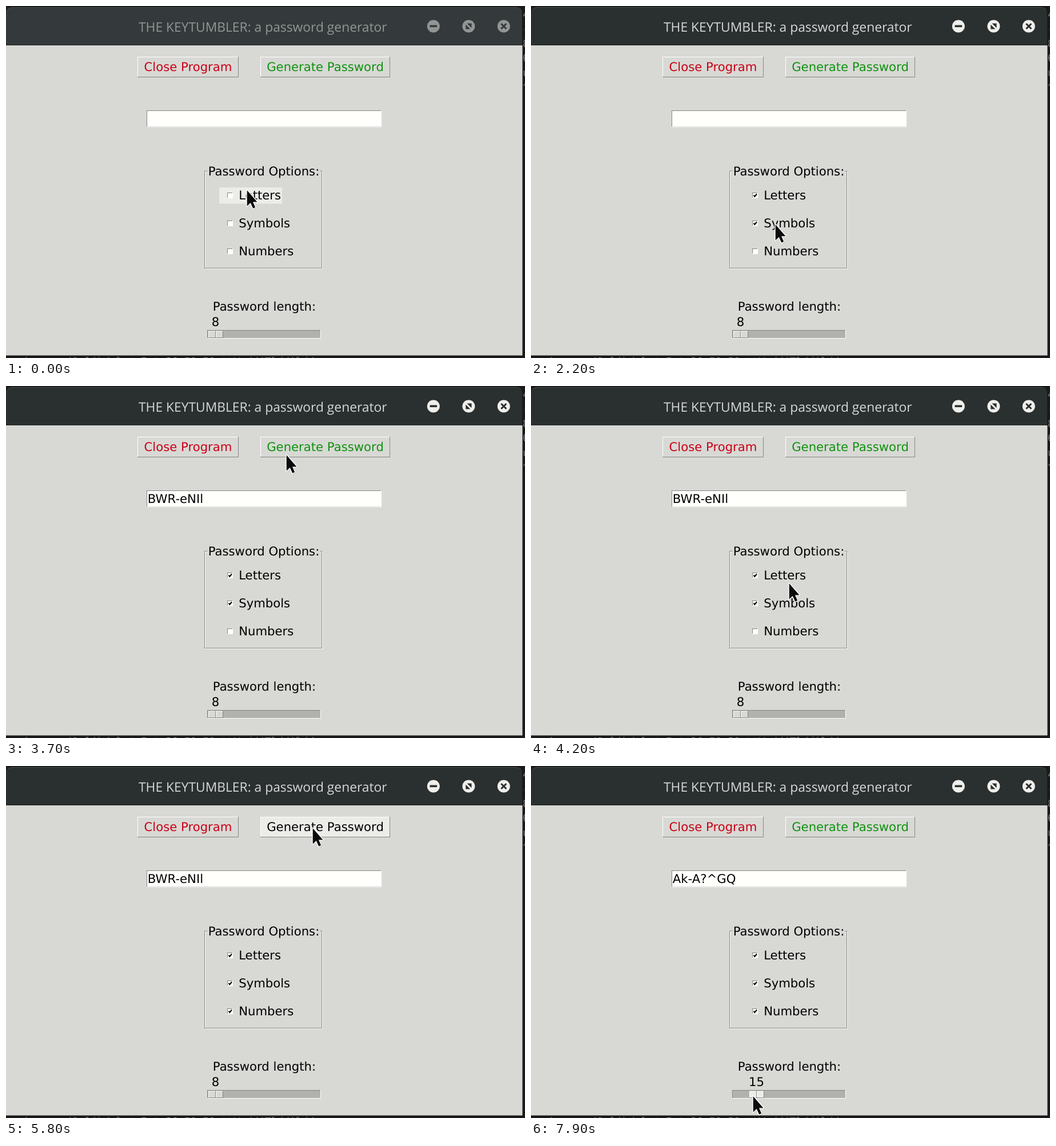
Recreate the animation shown at these times as an HTML page. Size 908 px wide and 617 px high, loop 8000 ms.

```html
<!DOCTYPE html>
<html lang="en">
<head>
<meta charset="utf-8">
<title>Password generator</title>
<style>
  html, body { margin: 0; width: 100%; height: 100%; overflow: hidden; background: #191a1a; }
  svg { display: block; width: 908px; height: 617px; }
  text { font: 21.2px "DejaVu Sans", sans-serif; text-rendering: geometricPrecision; white-space: pre; }
  .mid { text-anchor: middle; }
  .terminal text { font: 18px "DejaVu Sans Mono", monospace; fill: #777a78; }
  .caption { font: 22.8px "Open Sans", "Noto Sans", sans-serif; }
  .bar { fill: #343a3b; }
  .caption, .knob { fill: #929594; }
  .glyph { fill: #343a3b; stroke: #343a3b; stroke-width: 0; }
  .active .bar { fill: #2a2f30; }
  .active .caption { fill: #d6d9d7; }
  .active .knob { fill: #efefeb; }
  .active .glyph { fill: #2a2f30; stroke: #2a2f30; }
</style>
</head>
<body>
<svg viewBox="0 0 908 617">
  <rect width="908" height="617" fill="#191a1a"/>
  <g class="terminal" id="terminal">
    <text x="30" y="628.5">i sers (Delibdolet I t 26 50 50 ttWedd(Tldd|ldd</text>
  </g>
  <g id="window">
    <path class="bar" d="M0 70V10Q2 2 11 2H892Q903 2 903 13V70Z"/>
    <path d="M3 6Q6 2.5 12 2.5H892Q898 2.5 901 6" fill="none" stroke="#454b4c"/>
    <rect y="68" width="903" height="1" fill="#202526"/>
    <text class="caption" x="232" y="45">THE KEYTUMBLER: a password generator</text>
    <g class="knob">
      <circle cx="747.8" cy="35.5" r="11"/><circle cx="809.4" cy="35.5" r="11"/><circle cx="870.8" cy="35.5" r="11"/>
    </g>
    <g class="glyph">
      <rect x="741.5" y="33.5" width="12.6" height="3.6"/>
      <path d="M806.5 30.5H814.5V38.5ZM804.3 32.5V40.5H812.3Z"/>
      <path d="M866.3 31L875.3 40M875.3 31L866.3 40" style="stroke-width:3"/>
    </g>
    <rect y="69" width="903.5" height="543.5" fill="#d8d9d5"/>
    <g id="widgets"></g>
    <g id="cursor">
      <path d="M2 2V30L8.5 24.5L13 34.5L17.5 32.5L13.5 23H21Z" opacity=".18"/>
      <path d="M.7 1V28.7L6.7 23L11.2 32.8L15.2 31L11 21.5H18.5Z" fill="#0b0b0b" stroke="#fff" stroke-width="2.8" stroke-linejoin="round" paint-order="stroke"/>
    </g>
  </g>
</svg>
<script>
const LOOP = 8000, STEP = 100;
const FACE = '#d8d9d5', HOT = '#ecece9', PAPER = '#fffffb', LIGHT = '#ffffff', DARK = '#858683';
const $ = id => document.getElementById(id);

// Pointer: it rests at one place until the next move begins.
const home = { x: 421, y: 322 };
const moves = [
  { from: 1300, to: 1600, x: 427, y: 382 },
  { from: 2200, to: 2300, x: 431, y: 398 },
  { from: 2300, to: 2500, x: 466, y: 225 },
  { from: 2600, to: 3000, x: 488, y: 127 },
  { from: 3100, to: 3200, x: 490, y: 120 },
  { from: 3700, to: 4200, x: 451, y: 345 },
  { from: 4200, to: 4500, x: 449, y: 421 },
  { from: 5000, to: 5500, x: 536, y: 108 },
  { from: 6500, to: 6600, x: 388, y: 404 },
  { from: 6700, to: 7400, x: 360, y: 577 },
  { from: 7600, to: 7900, x: 388, y: 578 }
];
const clicks = [1100, 1700, 3200, 4700, 6000];
const dragStart = 7600;
const passwords = ['', 'BWR-eNIl', 'Ak-A?^GQ'];

const smooth = p => p * p * (3 - 2 * p);
function pointerAt(t) {
  let { x, y } = home;
  for (const move of moves) {
    if (t <= move.from) break;
    const p = smooth(Math.min(1, (t - move.from) / (move.to - move.from)));
    x += (move.x - x) * p;
    y += (move.y - y) * p;
  }
  return { x, y };
}

const generate = { x: 445, y: 89, w: 227, h: 36 };
const track = { x: 352, y: 568, w: 199, h: 15 };
const options = [['Letters', 110], ['Symbols', 127], ['Numbers', 133]]
  .map(([name, w], i) => ({ name, x: 373, y: 318 + 49 * i, w, h: 28.5 }));
const targets = [generate, track, ...options];

function widgetAt(t) {
  const p = pointerAt(t);
  return targets.find(r => p.x >= r.x && p.x < r.x + r.w && p.y >= r.y && p.y < r.y + r.h);
}

const rect = (x, y, w, h, fill) =>
  `<rect x="${x}" y="${y}" width="${w}" height="${h}" fill="${fill}"/>`;

function bevel({ x, y, w, h }, fill, sunken) {
  const [top, low] = sunken ? [DARK, LIGHT] : [LIGHT, DARK];
  return rect(x, y, w, h, low) + rect(x, y, w - 1, h - 1, top) +
         rect(x + 1, y + 1, w - 2, h - 2, fill);
}

const label = (s, x, y, fill = '#000', align = 'mid') =>
  `<text x="${x}" y="${y}" fill="${fill}" class="${align}">${s}</text>`;

function option(box, ticked, hot) {
  const { x, y, w, h, name } = box;
  const tick = `<path d="M389.5 ${y + 13.5}l1.8 2.5l3.7 -4.5" fill="none" stroke="#000" stroke-width="2"/>`;
  return (hot ? rect(x, y, w, h, HOT) : '') +
    bevel({ x: 387, y: y + 9, w: 10, h: 10 }, PAPER, true) +
    (ticked ? tick : '') + label(name, 407.2, y + 21, '#000', 'left');
}

function generateButton(hot, pressed) {
  const shift = pressed ? 1 : 0;
  return bevel(generate, hot ? HOT : FACE, pressed) +
    label('Generate Password', 558.5 + shift, 114 + shift, hot ? '#000' : '#0f920f');
}

function optionFrame() {
  const outline = (d, color) =>
    `<rect x="${347.5 + d}" y="${289.5 + d}" width="205" height="170" fill="none" stroke="${color}"/>`;
  return outline(1, LIGHT) + outline(0, DARK) + rect(353, 278, 196, 24, FACE) +
    label('Password Options:', 451, 297);
}

function slider(length, hot) {
  const x = 354 + (length - 8) * 4;
  const half = dx => bevel({ x: x + dx, y: 569.5, w: 13, h: 12.5 }, hot ? HOT : FACE);
  return label(length, x + 12.5, 561) + bevel(track, '#b1b2ae', true) + half(0) + half(13);
}

function render(t) {
  const pointer = pointerAt(t);
  const hovered = widgetAt(t + STEP); // the drawn pointer lags one step behind
  const done = clicks.filter(c => c <= t);
  const clicked = done.map(widgetAt);
  const pressed = clicked.at(-1) === generate && t < done.at(-1) + STEP;
  const generated = done.filter(c => c + STEP <= t && widgetAt(c) === generate).length;
  const length = 8 + (t > dragStart ? Math.round((pointer.x - 360) / 4) : 0);

  $('window').setAttribute('class', done.length ? 'active' : '');
  $('widgets').innerHTML =
    bevel({ x: 230, y: 89, w: 177, h: 36 }, FACE) +
    label('Close Program', 318.5, 114, '#cb0016') +
    generateButton(hovered === generate, pressed) +
    bevel({ x: 246, y: 183, w: 411, h: 29.5 }, PAPER, true) +
    label(passwords[generated], 247.8, 205, '#000', 'left') +
    optionFrame() +
    options.map(o => option(o, clicked.includes(o), hovered === o)).join('') +
    label('Password length:', 452, 534) +
    slider(length, hovered === track);
  $('cursor').setAttribute('transform', `translate(${pointer.x} ${pointer.y})`);
}

[...'4-86u^'].forEach((c, i) => {
  $('terminal').innerHTML += `<text x="904" y="${21 + 25.4 * i}">${c}</text>`;
});

const start = performance.now();
let shown = -1;
function tick() {
  const t = Math.floor(((performance.now() - start) % LOOP) / STEP) * STEP;
  if (t !== shown) render(shown = t);
  requestAnimationFrame(tick);
}
tick();
</script>
</body>
</html>
```
